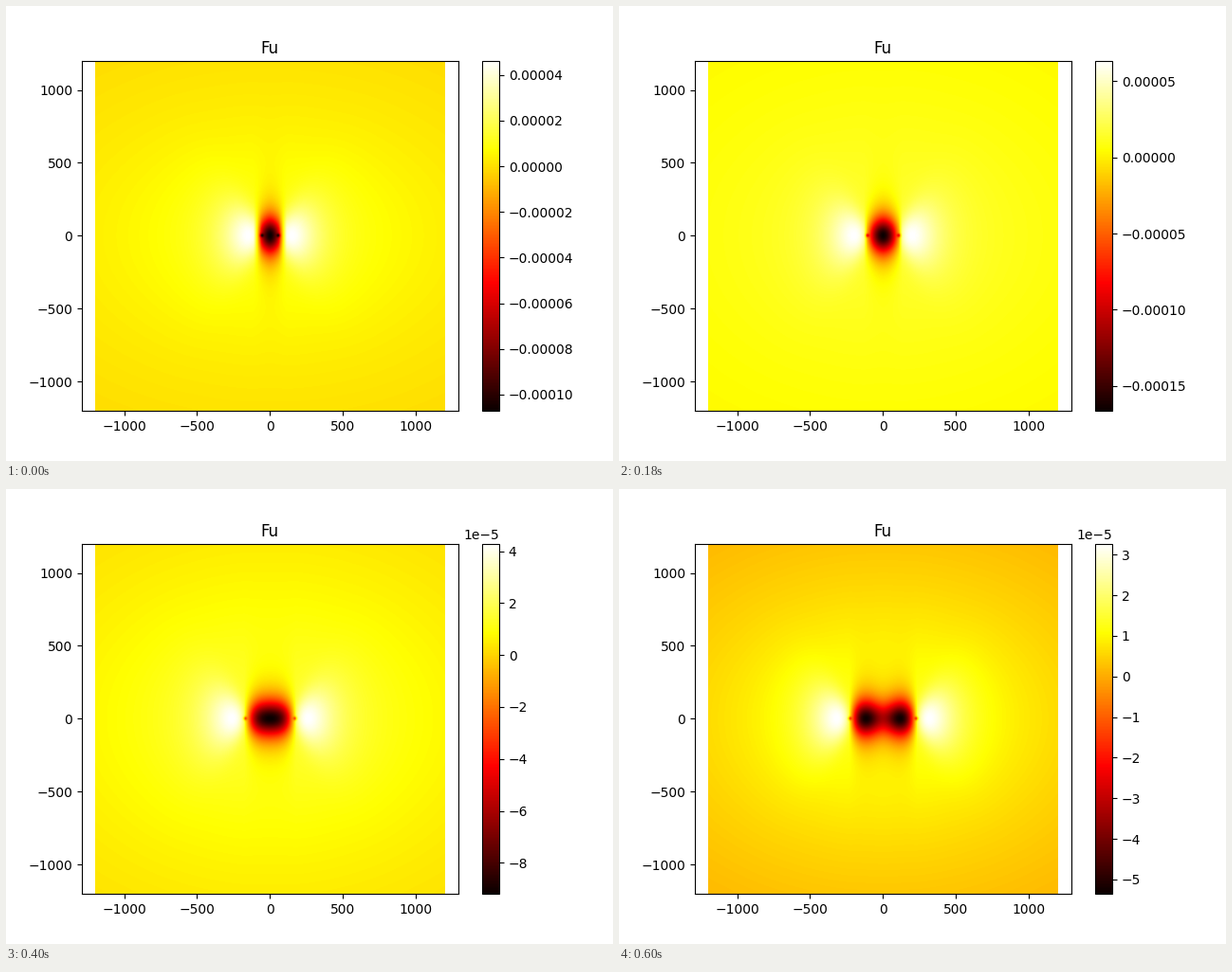
Animation of 640x480 px, one loop 0.62 s. Source, as a matplotlib script:

```python
import numpy as np
import matplotlib.pyplot as plt
from matplotlib.animation import FuncAnimation

FRAMES = 31
LIMIT = 1201
UNIT = 1e-5
WIDE = LIMIT * 396.8 / 369.6   # keeps both axes on one scale
EDGE = 1199

axis = np.linspace(-EDGE, EDGE, 370)
X, Y = np.meshgrid(axis, axis)


def lowest(t):
    return -1 / np.polyval([-8.2e-6, 6.44e-4, -8.83e-3, 0.0933], t)


def highest(t):
    return 1 / np.polyval([5.5e-7, -5.43e-5, 1.883e-3, -0.01949, 0.216], t)


def halo(x, y, t, tip):
    """Logarithmic far field, pinched above and below the core."""
    swell = t / 12 * np.exp(1 - t / 12)
    rho = np.sqrt(x ** 2 + ((1.5 - 0.2 * swell) * y) ** 2 + 220 ** 2)
    pinch = 0.45 * np.exp(-(x / (tip + 60)) ** 2 - (y / 420) ** 2)
    reach = 2060 + 950 * swell
    return (0.76 + 0.14 * swell) * np.log(reach / rho) * (1 - pinch)


def core(tip):
    """Negative trough between the two tips, at most 1 deep."""
    def pull(u):
        return u * np.exp(-(u / 110) ** 2 / 2)
    trough = np.minimum(pull(X - tip) - pull(X + tip), 0)
    trough = trough / (1 + (Y / 170) ** 2) ** 2
    return trough / -trough.min()


def lobes(tip):
    """Positive fans outside the tips, peaking at 1."""
    u = np.maximum(np.abs(X) - tip, 0) / 90
    width = 75 + 45 * u
    return u * np.exp(1 - u) * np.exp(-(Y / width) ** 2 / 2)


def field(t):
    tip = 60 + 5.7 * t
    low, high = lowest(t), highest(t)
    f = (halo(X, Y, t, tip)
         + (halo(0, 0, t, tip) - low) * core(tip + 5)
         + (high - halo(tip + 90, 0, t, tip)) * lobes(tip))
    spot = np.exp(-((np.abs(X) - tip) ** 2 + Y ** 2) / (2 * 9 ** 2))
    f -= 0.25 * (high - low) * spot
    return np.clip(f, low, high) * UNIT, low * UNIT, high * UNIT


fig, ax = plt.subplots(figsize=(6.4, 4.8), dpi=100)
data, low, high = field(0)
image = ax.imshow(data, cmap="hot", vmin=low, vmax=high, origin="lower",
                  extent=(-EDGE, EDGE, -LIMIT, LIMIT), aspect="auto",
                  interpolation="nearest")
fig.colorbar(image, ax=ax)
ax.set_xlim(-WIDE, WIDE)
ax.set_ylim(-LIMIT, LIMIT)
ax.set_title("Fu", pad=5.3)


def draw(i):
    values, lo, hi = field(i)
    image.set_data(values)
    image.set_clim(lo, hi)
    return [image]


anim = FuncAnimation(fig, draw, frames=FRAMES, interval=20,
                     repeat=True, repeat_delay=0, blit=False)
plt.show()
```
